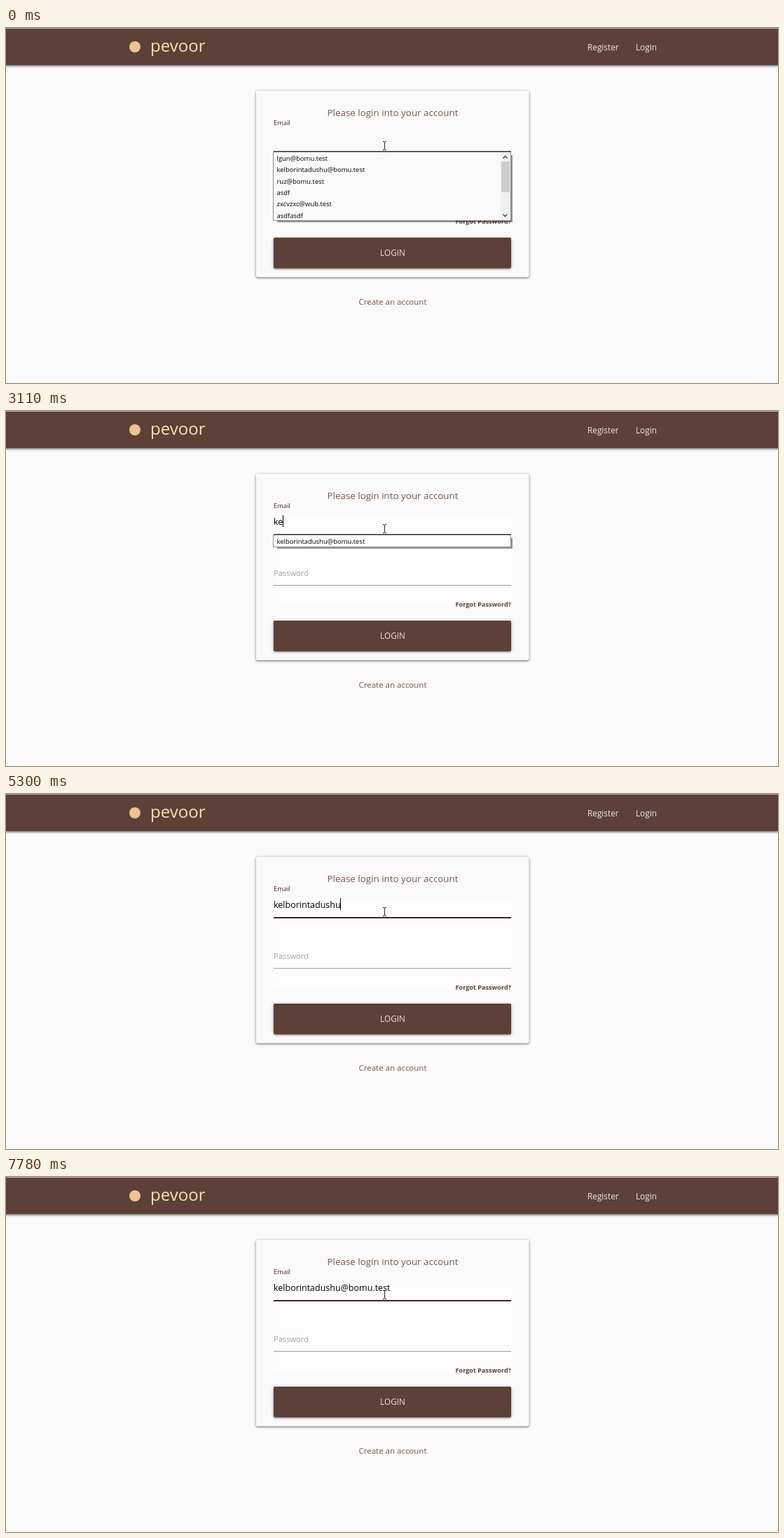
An HTML page with a canvas for the animation above (8000 ms loop, 1102x508 px).

```html
<!DOCTYPE html>
<html lang="en">
<head>
<meta charset="utf-8">
<title>Login form</title>
<style>
  html, body { margin: 0; width: 100%; height: 100%; overflow: hidden; background: #fafafa; }
  canvas { display: block; }
</style>
</head>
<body>
<canvas id="stage" width="1102" height="508"></canvas>
<script>
const ctx = document.getElementById('stage').getContext('2d');
const LOOP = 8000;
const BROWN = '#5d4037', LIGHT_BROWN = '#795548', DARK = '#3e2723', PAGE = '#fafafa';
const USER = 'kelborintadushu';
const EMAIL = USER + '@bomu.test';
const SAVED = ['lgun@bomu.test', EMAIL, 'ruz@bomu.test', 'asdf', 'zxcvzxc@wub.test', 'asdfasdf'];

// Typing rhythm and the times at which the caret flips (it starts hidden)
const TYPE_START = 2990, KEY_STEP = 120, LAST_KEY = 11;
const CARET_FLIPS = [370, 990, 1490, 1990, 2490, 5180, 5300, 5670, 6170, 6670, 7170, 7780];

function rect(x, y, w, h, color) {
  ctx.fillStyle = color;
  ctx.fillRect(x, y, w, h);
}

function text(str, x, y, size, color, align = 'left', weight = 400) {
  ctx.font = `${weight} ${size}px "Open Sans", "Noto Sans", sans-serif`;
  ctx.textAlign = align;
  ctx.fillStyle = color;
  ctx.fillText(str, x, y);
}

function raised(x, y, w, h, radius, color) {
  for (const [dy, blur, alpha] of [[1.6, 2, 0.3], [0.8, 4, 0.34]]) {
    ctx.save();
    ctx.shadowColor = `rgba(0,0,0,${alpha})`;
    ctx.shadowOffsetY = dy;
    ctx.shadowBlur = blur;
    ctx.fillStyle = color;
    ctx.beginPath();
    ctx.roundRect(x, y, w, h, radius);
    ctx.fill();
    ctx.restore();
  }
}

function chevron(x, y, dir) {
  ctx.strokeStyle = '#505050';
  ctx.lineWidth = 1.6;
  ctx.beginPath();
  ctx.moveTo(x - 3, y + 1.5 * dir);
  ctx.lineTo(x, y - 1.5 * dir);
  ctx.lineTo(x + 3, y + 1.5 * dir);
  ctx.stroke();
}

function drawHeader() {
  raised(-6, -6, 1114, 59, 0, BROWN);
  rect(0, 0, 1102, 1, '#b9afac');
  ctx.fillStyle = '#eec394';
  ctx.beginPath();
  ctx.arc(184, 27, 8, 0, Math.PI * 2);
  ctx.fill();
  text('pevoor', 206, 34, 24, '#ffe0b2');
  text('Register', 830, 32, 11.8, '#efebe9');
  text('Login', 899, 32, 11.8, '#efebe9');
}

function drawCard(typing) {
  raised(357, 90, 389.5, 266.5, 2, PAGE);
  if (typing) rect(381, 149, 342, 131, '#fdfdfd');
  text('Please login into your account', 552, 126, 13.4, LIGHT_BROWN, 'center');
  text('Email', 382, 139, 9.4, '#45202c');
  rect(382, 176, 339, 2, DARK);
  text('Password', 382, 236, 11.1, '#9e9e9e');
  rect(382, 249, 339, 1, '#9e9e9e');
  text('Forgot Password?', 721, 280, 9.1, BROWN, 'right', 700);
  raised(382, 300, 339, 43.5, 2, BROWN);
  text('LOGIN', 552, 326, 11.8, '#efe0d6', 'center');
  text('Create an account', 552, 396, 11.5, LIGHT_BROWN, 'center');
}

function drawPopup(rows, y, h, color) {
  rect(387, y + h, 336, 2, 'rgba(0,0,0,.42)');
  rect(721, y + 5, 2, h - 5, 'rgba(0,0,0,.42)');
  rect(381, y, 340, h, '#8f8f8f');
  rect(382, y + 1, 338, h - 2, color);
  rows.forEach((row, i) => text(row, 386.5, y + 13 + i * 16.3, 9.45, '#000'));
}

function drawFullList() {
  drawPopup(SAVED, 177, 99, PAGE);
  rect(706, 178, 14, 97, '#f0f0f0');
  rect(707, 191, 12, 44, '#cdcdcd');
  chevron(712.5, 185, 1);
  chevron(712.5, 268, -1);
}

function typedText(t) {
  if (t < TYPE_START) return '';
  if (t >= 7290) return EMAIL;
  if (t >= 6420) return USER + '@';
  const key = Math.min(LAST_KEY, Math.floor((t - TYPE_START) / KEY_STEP));
  return USER.slice(0, Math.floor(1 + (USER.length - 1) * key / LAST_KEY));
}

function drawField(t) {
  const value = typedText(t);
  text(value, 382, 163, 12.5, '#000');
  const flips = CARET_FLIPS.filter(at => at <= t).length;
  if (flips % 2) rect(Math.floor(382 + ctx.measureText(value).width), 149, 1, 17, '#000');
}

function drawPointer() {
  rect(540, 163, 1, 11, '#222');
  for (const y of [162, 174]) {
    rect(538, y, 2, 1, '#222');
    rect(541, y, 2, 1, '#222');
  }
}

function draw(t) {
  const typing = t >= TYPE_START;
  rect(0, 0, 1102, 508, PAGE);
  drawHeader();
  drawCard(typing);
  drawField(t);
  if (!typing) drawFullList();
  else if (t < 4680) drawPopup([EMAIL], 177, 18, '#fefefe');
  else if (t >= 5420 && t < 7410) drawPopup([EMAIL], 178, 18, '#fefefe');
  drawPointer();
}

const start = performance.now();
function tick() {
  draw((performance.now() - start) % LOOP);
  requestAnimationFrame(tick);
}
tick();
</script>
</body>
</html>
```
